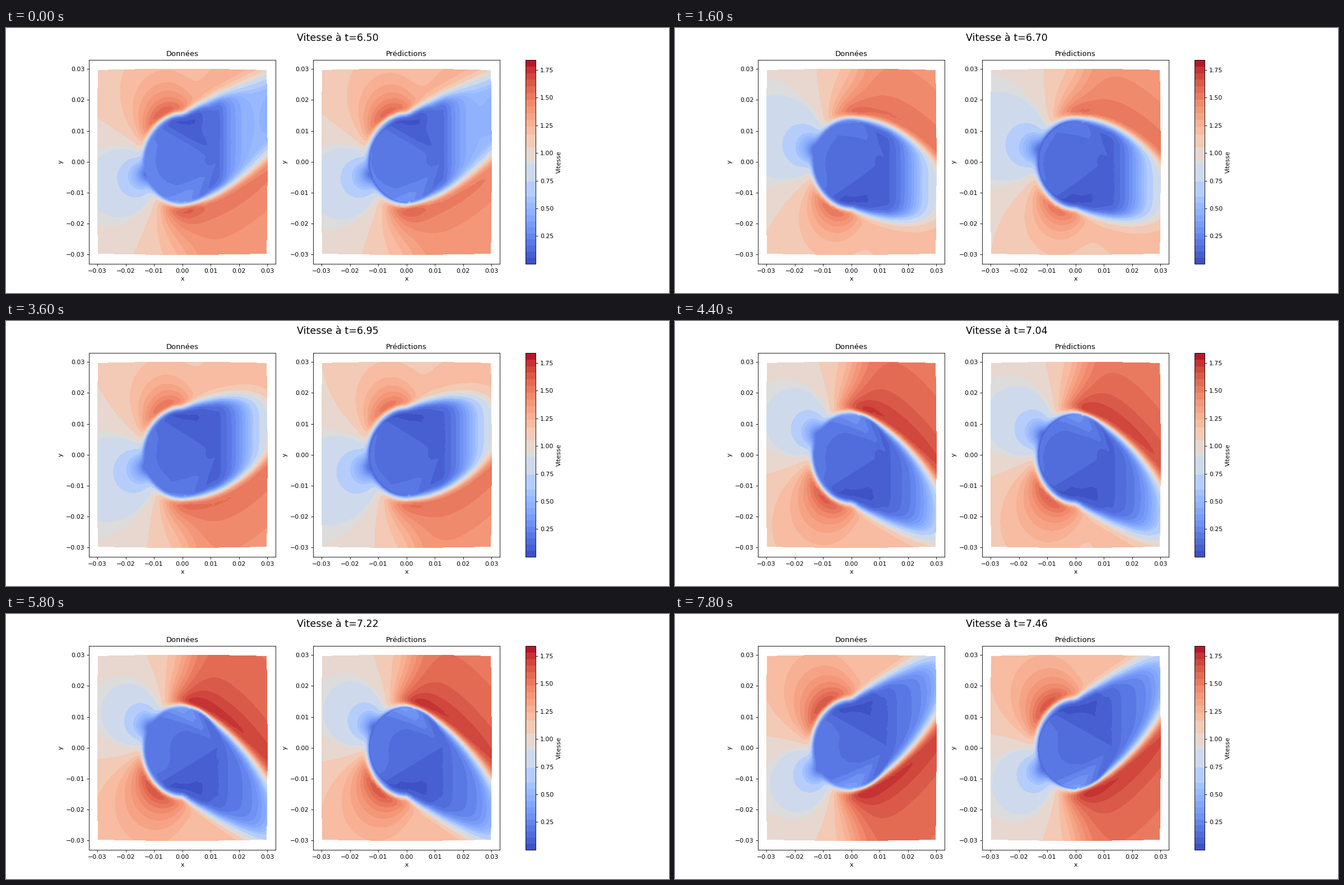
Animation, 1183 px wide and 473 px high, one loop 8 s. Source, as a matplotlib script:

```python
import numpy as np
import matplotlib.pyplot as plt
from matplotlib.animation import FuncAnimation
from matplotlib.cm import ScalarMappable
from matplotlib.colors import BoundaryNorm, ListedColormap
from matplotlib.tri import Triangulation

W, H, DPI = 1183, 473, 78.875
FRAMES, INTERVAL = 40, 200
T0, DT = 6.5025, 0.0246
RADIUS = 1.3               # cylinder radius; lengths are hundredths of an axis unit
STAG = 0.66                # swing of the front stagnation point
START, STEP = 0.3, 0.15    # shedding phase at the start and per frame


def make_mesh():
    """Scattered nodes around the cylinder, with the hole left empty."""
    rng = np.random.default_rng(3)
    line = np.linspace(-3, 3, 76)
    x, y = (a.ravel() for a in np.meshgrid(line, line))
    inner = (abs(x) < 2.99) & (abs(y) < 2.99)
    x = x + inner * rng.uniform(-.022, .022, x.size)
    y = y + inner * rng.uniform(-.022, .022, y.size)
    z = x * (1 - .010 * (y / 3) ** 2) + 1j * y * (1 - .013 * (x / 3) ** 2)
    parts = [z[abs(z) > 1.58]]
    for r, count in ((1.27, 26), (1.32, 90), (1.38, 90), (1.45, 90), (1.53, 90)):
        turn = (np.arange(count) + rng.uniform(-.25, .25, count)) / count
        parts.append(r * np.exp(2j * np.pi * turn))
    return np.concatenate(parts)


mesh = make_mesh()
X, Y, R = mesh.real, mesh.imag, abs(mesh)
BEHIND = np.maximum(X, 0)             # distance downstream of the centre
PAST = np.maximum(X - RADIUS, 0)      # distance downstream of the cylinder
tri = Triangulation(X / 100, Y / 100)


def wave(phase, peak, harmonic=1):
    return np.cos(2 * np.pi * harmonic * (phase - peak))


def ramp(a):
    """Smooth step from 0 to 1."""
    return .5 * (1 + np.tanh(a))


def potential(c):
    """Speed of the ideal flow past the cylinder, tilted by the swing c."""
    tilt = np.exp(1j * np.arcsin(STAG * c / RADIUS))
    return abs(1 - (RADIUS * tilt / (mesh * np.maximum(1, RADIUS / R))) ** 2)


def wake_shape(phase):
    """Height above the swaying wake axis, and signed distance to its edge."""
    sway = wave(phase, .18)
    off = Y - sway * (.1 + .45 * BEHIND + .07 * BEHIND ** 2)
    half = 1.5 + .15 * BEHIND - .09 * BEHIND ** 2
    half += .2 * (BEHIND / 3) ** 2 * wave(phase, .3, 2)
    slope = sway * (.45 + .14 * BEHIND) * BEHIND / (BEHIND + .5)
    side = (abs(off) - half) / np.sqrt(1 + slope ** 2)
    nose = np.hypot(1.07 * X, off) - 1.5
    return off, np.where(X < 0, nose, side)


def wake_speed(phase):
    """Slow flow on the cylinder and in the pulsing wake behind it."""
    wall = .08 * np.clip(-X, 0, 1)
    wall -= .2 * wave(phase, .17) * Y * np.exp(-(X / .6) ** 2) * (R < 2)
    pulse = wave(phase, .05 + .1 * PAST, 2)
    return np.maximum(.12 + wall + .3 * PAST - (.03 + .15 * PAST) * pulse, .05)


def jet(phase):
    """Speed beside the lower shear layer; the upper one is half a cycle off."""
    return 1.42 + .25 * wave(phase, .13) + .08 * wave(phase, .16, 2)


def outer_speed(phase, c, off, gap):
    upstream = potential(c) * (1.04 + .05 * wave(phase, .19, 2))
    upper = ramp(off / .3)
    peak = upper * jet(phase + .5) + (1 - upper) * jet(phase)
    fade = .7 + .45 * np.exp(-np.maximum(gap, 0))
    beside = 1 + (peak - 1) * fade
    return upstream + (beside - upstream) * ramp((X - .3) / .6)


def speeds(i):
    """Measured and predicted speed on the mesh."""
    phase = (START + STEP * i) % 1
    c = wave(phase, .15)
    off, gap = wake_shape(phase)
    wake = wake_speed(phase)
    outer = outer_speed(phase, c, off, gap)
    width = .1 + (.06 + .03 * c * np.tanh(Y)) * BEHIND
    mix = ramp(gap / width)

    def near_wall(depth):
        return wake + (outer - wake) * mix * (1 - np.exp(-((R - 1.27) / depth) ** 2))

    rim = np.exp(-((R - 1.32) / .03) ** 2) * ramp((.2 - X) / .3)
    data, pred = near_wall(.1), near_wall(.07) * (1 - .5 * rim) * .99
    return [np.clip(v, .002, 1.835) for v in (data, pred)]


levels = np.concatenate([np.arange(12) * .055, [.74, .905, .94, 1.05, 1.165],
                         np.linspace(1.24, 1.84, 11)])
middles = (levels[1:] + levels[:-1]) / 2
cmap = ListedColormap(plt.get_cmap("coolwarm")(middles / levels[-1]))
norm = BoundaryNorm(levels, cmap.N)

plt.rcParams["font.family"] = "DejaVu Sans"
fig, axes = plt.subplots(1, 2, dpi=DPI,
                         figsize=((W + 1e-6) / DPI, (H + 1e-6) / DPI))
ticks = np.arange(-3, 4) / 100
for ax, name in zip(axes, ("Données", "Prédictions")):
    ax.set(title=name, xlabel="x", ylabel="y", xticks=ticks, yticks=ticks)
bar = fig.colorbar(ScalarMappable(norm, cmap), ax=axes, spacing="proportional",
                   ticks=np.arange(.25, 1.8, .25), format="%.2f")
bar.minorticks_off()
bar.set_label("Vitesse")
title = fig.suptitle("", fontsize=16)
drawn = []


def update(i):
    while drawn:
        drawn.pop().remove()
    for ax, v in zip(axes, speeds(i)):
        drawn.append(ax.tricontourf(tri, v, levels=levels, cmap=cmap, norm=norm))
        ax.set(xlim=(-.033, .033), ylim=(-.033, .033))
    title.set_text(f"Vitesse à t={T0 + DT * i:.2f}")
    return [title]


anim = FuncAnimation(fig, update, frames=FRAMES, interval=INTERVAL,
                     repeat=True, repeat_delay=0, blit=False)
plt.show()
```
